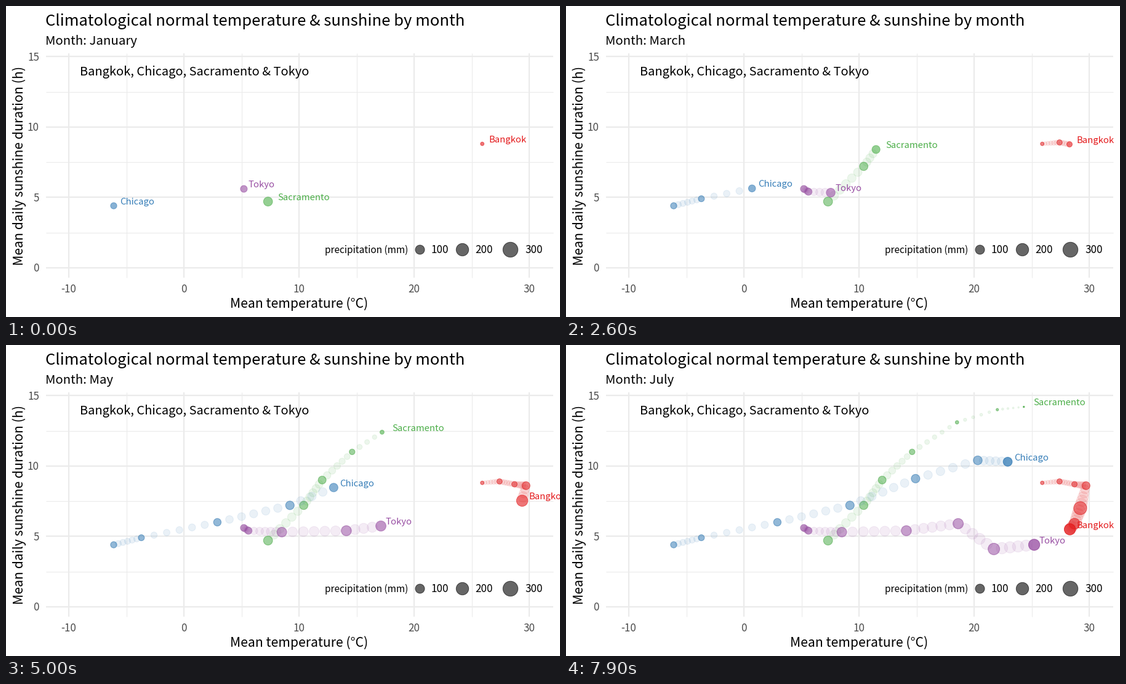
These frames come from a looping animation (900 px wide and 506 px high, 8 s). A matplotlib script:

```python
import numpy as np
import matplotlib.pyplot as plt
from matplotlib.animation import FuncAnimation
from matplotlib.colors import to_rgba
from matplotlib.patches import Rectangle

W, H, DPI = 900, 506, 64  # a power of two keeps the pixel size exact
PT = 72 / DPI
FRAMES, INTERVAL = 80, 100
plt.rcParams["font.family"] = "Noto Sans CJK JP"

MONTHS = ["January", "February", "March", "April", "May", "June", "July"]
# Each month is held between a pair of frames, then the dots travel on.
HOLDS = [4, 10, 16, 22, 28, 34, 40, 46, 52, 58, 63, 69, 74, 80]
TRAIL_START = HOLDS[0]
STOPS = np.repeat(np.arange(len(MONTHS)), 2)

# name: colour, label offset, temperature, sunshine, precipitation
CITIES = {
    "Bangkok": ("#E41A1C", 12.2,
                [25.9, 27.4, 28.7, 29.7, 29.2, 28.7, 28.3],
                [8.8, 8.9, 8.7, 8.6, 7.0, 5.9, 5.5],
                [8, 26, 28, 70, 220, 145, 156]),
    "Chicago": ("#377EB8", 11.2,
                [-6.1, -3.7, 2.9, 9.2, 14.9, 20.3, 22.9],
                [4.4, 4.9, 6.0, 7.2, 9.1, 10.4, 10.3],
                [39, 36, 62, 84, 84, 90, 92]),
    "Sacramento": ("#4DAF4A", 16.9,
                   [7.3, 10.4, 12.0, 14.6, 18.5, 22.0, 24.3],
                   [4.7, 7.2, 9.0, 11.0, 13.1, 14.0, 14.2],
                   [95, 79, 68, 29, 7, 2, 0]),
    "Tokyo": ("#984EA3", 8.6,
              [5.2, 5.6, 8.5, 14.1, 18.6, 21.7, 25.2],
              [5.6, 5.4, 5.3, 5.4, 5.9, 4.1, 4.4],
              [48, 53, 112, 123, 130, 168, 155]),
}


def px(temp):
    return 289.1 + 18.71 * np.asarray(temp)


def py(hours):
    return 425.8 - 22.9 * np.asarray(hours)


def radius(mm):
    return 1.6 + 0.64 * np.sqrt(mm)


def marker_area(r):
    """Scatter area for a disc of outer radius r with a 1 px rim."""
    return (2 * (r - 0.5) * PT) ** 2


fig = plt.figure(figsize=(W / DPI, H / DPI), dpi=DPI, facecolor="white")
ax = fig.add_axes([0, 0, 1, 1])
ax.set_xlim(0, W)
ax.set_ylim(H, 0)
ax.axis("off")

LEFT, RIGHT, TOP, BOTTOM = 64.5, 888.5, 77, 442
panel = Rectangle((LEFT, TOP), RIGHT + 1 - LEFT, BOTTOM - TOP, transform=ax.transData)


def write(x, y, text, size, color="black", ha="left", **kw):
    return ax.text(x, y, text, fontsize=size * PT, color=color, ha=ha,
                   va="baseline", **kw)


def grid(temps, hours, width):
    style = dict(color="#EBEBEB", lw=width * PT, zorder=0, solid_capstyle="butt")
    for t in temps:
        ax.plot([px(t)] * 2, [TOP, BOTTOM], **style)
    for h in hours:
        ax.plot([LEFT, RIGHT], [py(h)] * 2, **style)


grid(range(-5, 30, 10), (2.5, 7.5, 12.5), 1.1)
grid(range(-10, 31, 10), range(0, 16, 5), 2.2)
for t in range(-10, 31, 10):
    write(px(t), 466, str(t), 17, "#4D4D4D", "center")
for h in range(0, 16, 5):
    write(54, py(h) + 6.2, str(h), 17, "#4D4D4D", "right")

write(64, 31.5, "Climatological normal temperature & sunshine by month", 25.6)
subtitle = write(64, 62.5, "", 20.4)
write(120, 113, "Bangkok, Chicago, Sacramento & Tokyo", 20.05, zorder=2)
write(476, 491, "Mean temperature (°C)", 21.1, ha="center")
write(28, 259.5, "Mean daily sunshine duration (h)", 21.2, ha="center",
      rotation=90, rotation_mode="anchor")

write(517.5, 402, "precipitation (mm)", 15.45)
for x, label_x, mm in ((672, 690, 100), (741, 762.5, 200), (819, 843.5, 300)):
    ax.scatter(x, 396.2, s=marker_area(radius(mm)), color=[(0, 0, 0, 0.6)], lw=PT)
    write(label_x, 402.5, str(mm), 17)

dots = ax.scatter([], [], lw=PT, zorder=3)
dots.set_clip_path(panel)
labels = {}
for name, (color, *_) in CITIES.items():
    labels[name] = write(0, 0, name, 14.85, color, zorder=4)
    labels[name].set_clip_path(panel)


def city_state(city, when):
    """Pixel position and radius of a city's dot at the given month values."""
    _, _, temp, sun, rain = city
    index = np.arange(len(MONTHS))
    return [np.interp(when, index, track)
            for track in (px(temp), py(sun), radius(np.array(rain)))]


def draw(frame):
    # Every earlier step leaves a faint dot, so held months build up.
    steps = np.append(np.arange(TRAIL_START, frame), frame)
    when = np.interp(steps, HOLDS, STOPS)
    states = np.array([city_state(c, when) for c in CITIES.values()])
    x, y, r = (states[:, k].T.ravel() for k in range(3))
    colors = [to_rgba(c[0], 0.6 if i == len(steps) - 1 else 0.1)
              for i in range(len(steps)) for c in CITIES.values()]
    dots.set_offsets(np.column_stack([x, y]))
    dots.set_sizes(marker_area(r), DPI)
    dots.set_facecolor(colors)
    dots.set_edgecolor(colors)

    for (name, city), state in zip(CITIES.items(), states):
        labels[name].set_position((state[0, -1] + city[1] - 1, state[1, -1] - 2.3))
    nearest = int(np.ceil(when[-1] - 0.5 - 1e-6))
    subtitle.set_text("Month: " + MONTHS[nearest])
    return [dots, subtitle, *labels.values()]


anim = FuncAnimation(fig, draw, frames=FRAMES, interval=INTERVAL,
                     init_func=lambda: draw(0), repeat=True, repeat_delay=0)
plt.show()
```
